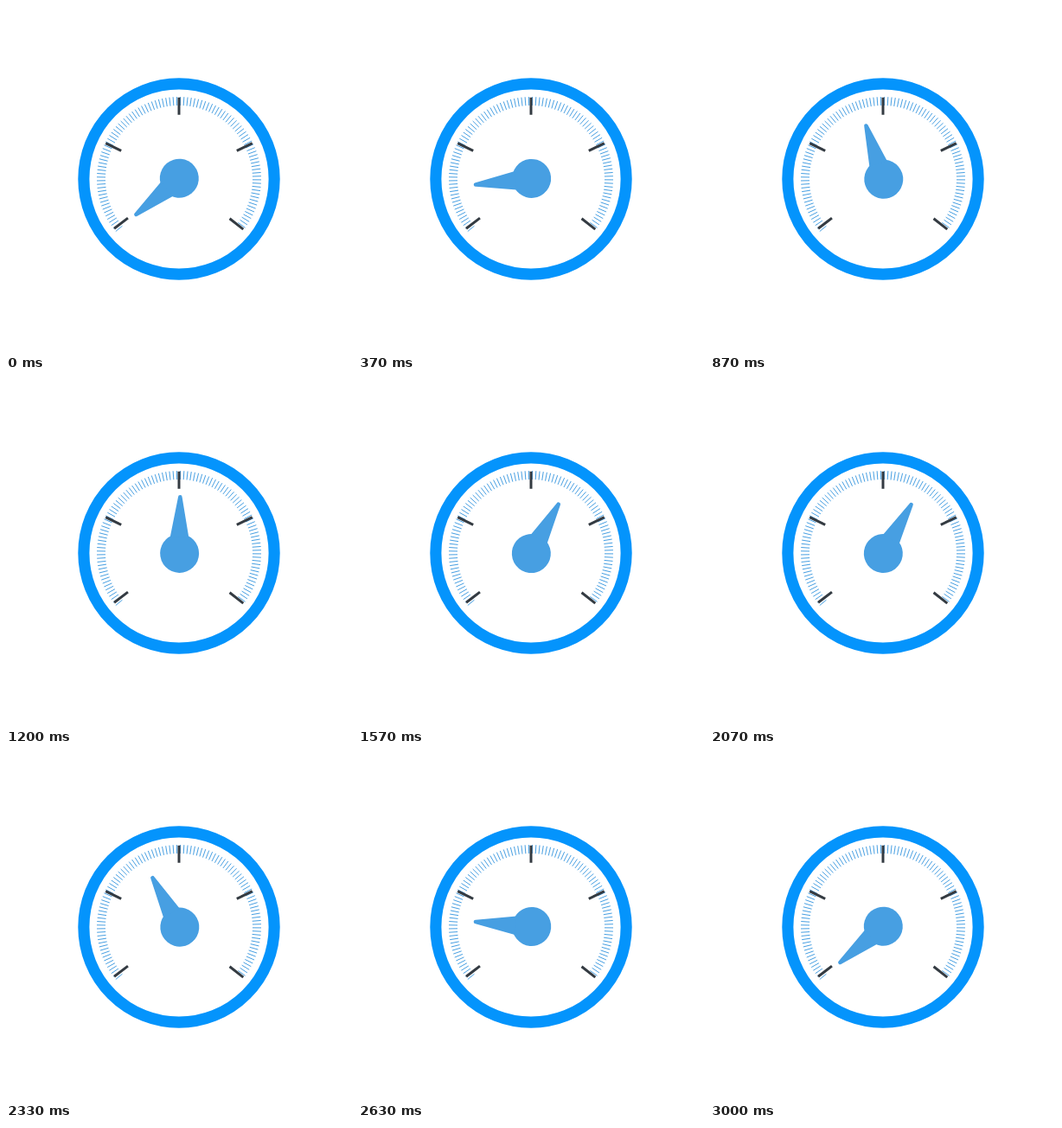
Write an HTML page that moves like this. It is 400 px wide and 400 px high and loops after 3.11 s.

```html
<!DOCTYPE html>
<html lang="en">
<head>
<meta charset="utf-8">
<title>Gauge</title>
<style>
  html, body { margin: 0; width: 100%; height: 100%; overflow: hidden; background: #fff; }
  svg { display: block; width: 100vw; height: 100vh; }
</style>
</head>
<body>
<svg viewBox="0 0 400 400">
  <circle cx="200" cy="200" r="110.15" fill="none" stroke="#0494fc" stroke-width="13.1"/>
  <path id="minor" fill="none" stroke="#479fe2" stroke-width="1"/>
  <path id="major" fill="none" stroke="#343b42" stroke-width="3"/>
  <g id="needle" fill="#479fe2">
    <circle cx="0.45" cy="0.5" r="22.5"/>
    <path d="M-10.8 -18 L-2.3 -64.5 A2.3 2.3 0 0 1 2.3 -64.5 L10.8 -18 Z"/>
  </g>
</svg>
<script>
const LOOP = 3110, STEP = 33.34;
const REST = -129.5, PEAK = 80;
const PAUSE_AT = 33.5, PEAK_AT = 55.8, END_AT = 90;

const $ = id => document.getElementById(id);

function ticks(angles, inner, outer) {
  return angles.map(deg => {
    const a = deg * Math.PI / 180;
    const at = r => `${(200 + r * Math.sin(a)).toFixed(2)} ${(200 - r * Math.cos(a)).toFixed(2)}`;
    return `M${at(inner)}L${at(outer)}`;
  }).join("");
}

// Rise to upright, swing on to the peak, then fall back to rest.
function angle(n) {
  if (n < PAUSE_AT) {
    const t = n / PAUSE_AT;
    const smooth = t * t * (3 - 2 * t);
    return REST * (1 - 0.9 * smooth - 0.1 * t);
  }
  if (n < PEAK_AT) {
    const t = (n - PAUSE_AT) / (PEAK_AT - PAUSE_AT);
    return PEAK * t * t;
  }
  const left = Math.max(0, (END_AT - n) / (END_AT - PEAK_AT));
  return REST + (PEAK - REST) * left ** 1.36;
}

function draw(now) {
  const n = Math.min(END_AT, Math.floor((now % LOOP + 5) / STEP));
  $("needle").setAttribute("transform", `translate(200.2 199.9) rotate(${angle(n).toFixed(2)})`);
}

const minor = Array.from({ length: 101 }, (_, i) => -129.6 + i * 2.56);
$("minor").setAttribute("d", ticks(minor, 85, 95));
$("major").setAttribute("d", ticks([-127.4, -64, 0, 64, 128], 74.3, 94.3));

const start = performance.now();
function loop() {
  draw(performance.now() - start);
  requestAnimationFrame(loop);
}
loop();
</script>
</body>
</html>
```
